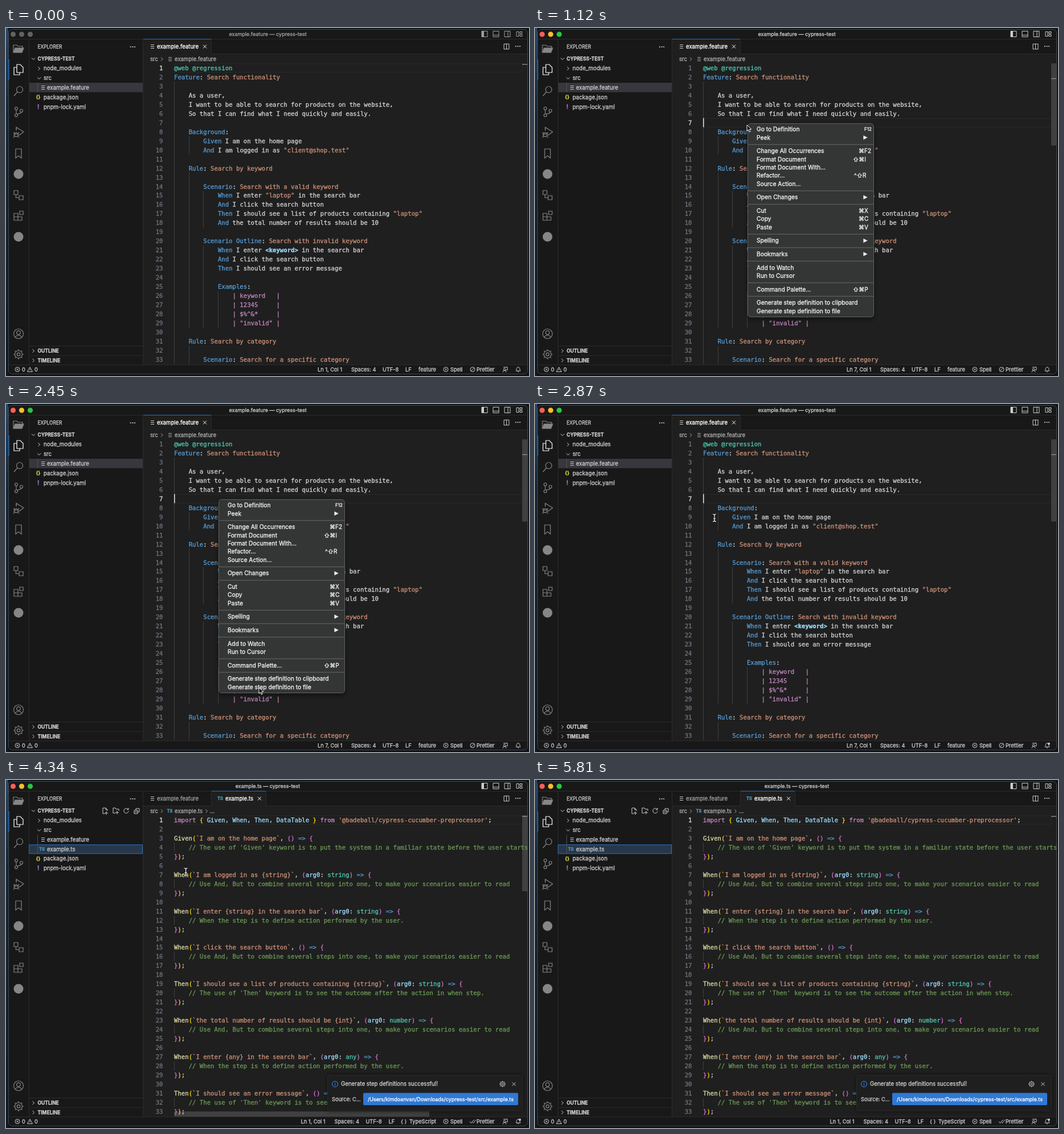
These frames come from a looping animation (918 by 610 pixels, 5.88 s). An HTML page with a canvas:

```html
<!DOCTYPE html>
<html lang="en">
<head>
<meta charset="utf-8">
<title>Editor demo</title>
<style>
html, body { margin: 0; width: 100%; height: 100%; overflow: hidden; background: #0c1620; }
canvas { display: block; }
</style>
</head>
<body>
<canvas id="stage" width="918" height="610"></canvas>
<script>
const c = document.getElementById('stage').getContext('2d');
const LOOP = 5880, STEP = 70;
const T = { enter: 70, focus: 630, menu: 1050, pick: 2590, gone: 2730, bell: 2870, made: 2940, hover: 3290, blur: 3430, open: 3780, leave: 5000 };
const GREY = '#868686', TEXT = '#cccccc', BLUE = '#569cd6', ORANGE = '#ce9178', PURPLE = '#c586c0',
  TEAL = '#4ec9b0', SKY = '#9cdcfe', GOLD = '#ffd700', ORCHID = '#da70d6', CODE = '#d4d4d4', ACCENT = '#2a6fb8';
const CW = 6.41, LH = 15.97, LEFT = 295, TOP = 70, MONO = '10.65px "DejaVu Sans Mono", monospace';

// ---------- documents ----------
const feature = `@web @regression
Feature: Search functionality

    As a user,
    I want to be able to search for products on the website,
    So that I can find what I need quickly and easily.

    Background:
        Given I am on the home page
        And I am logged in as "client@shop.test"

    Rule: Search by keyword

        Scenario: Search with a valid keyword
            When I enter "laptop" in the search bar
            And I click the search button
            Then I should see a list of products containing "laptop"
            And the total number of results should be 10

        Scenario Outline: Search with invalid keyword
            When I enter <keyword> in the search bar
            And I click the search button
            Then I should see an error message

            Examples:
                | keyword   |
                | 12345     |
                | $%^&*     |
                | "invalid" |

    Rule: Search by category

        Scenario: Search for a specific category`.split('\n');

const notes = {
  given: "The use of 'Given' keyword is to put the system in a familiar state before the user starts",
  and: 'Use And, But to combine several steps into one, to make your scenarios easier to read',
  when: 'When the step is to define action performed by the user.',
  then: "The use of 'Then' keyword is to see the outcome after the action in when step."
};
const step = (word, text, type, note) =>
  [`${word}(\`${text}\`, (${type && 'arg0: ' + type}) => {`, '    // ' + notes[note], '});', ''];
const script = [
  "import { Given, When, Then, DataTable } from '@badeball/cypress-cucumber-preprocessor';", '',
  ...step('Given', 'I am on the home page', '', 'given'),
  ...step('When', 'I am logged in as {string}', 'string', 'and'),
  ...step('When', 'I enter {string} in the search bar', 'string', 'when'),
  ...step('When', 'I click the search button', '', 'and'),
  ...step('Then', 'I should see a list of products containing {string}', 'string', 'then'),
  ...step('When', 'the total number of results should be {int}', 'number', 'and'),
  ...step('When', 'I enter {any} in the search bar', 'any', 'when'),
  ...step('Then', 'I should see an error message', '', 'then')
].slice(0, 33);

const featureRules = [
  [/@.*/y, TEAL], [/\|.*/y, PURPLE],
  [/(Feature|Rule|Scenario Outline|Scenario|Background|Examples)(?=:)/y, BLUE],
  [/(?<=^ *(Feature|Rule|Scenario Outline|Scenario):).+/y, ORANGE],
  [/(?<=^ *)(Given|When|Then|And)\b/y, BLUE],
  [/"[^"]*"/y, ORANGE], [/<\w+>/y, SKY, 700], [/\w+|./y, CODE]
];
const scriptRules = [
  [/\/\/.*/y, '#6a9955'], [/`[^`]*`|'[^']*'/y, ORANGE], [/import|from/y, PURPLE],
  [/(Given|When|Then)(?=\()/y, '#dcdcaa'], [/=>/y, BLUE], [/(?<=: )\w+/y, TEAL], [/\w+/y, SKY],
  [/(?<=\w)\(|(?<=\})\)|(?<=import )\{|\}(?= from)/y, GOLD], [/[(){}]/y, ORCHID], [/./y, CODE]
];
// [column, first line, last line]
const featureGuides = [[0, 3, 33], [4, 9, 10], [4, 13, 29], [4, 32, 33], [8, 15, 18], [8, 21, 29], [12, 26, 29]];
const scriptGuides = Array.from({ length: 8 }, (_, i) => [0, 4 + i * 4, 4 + i * 4]);

// ---------- drawing helpers ----------
// A hairline stroke gives the glyphs a slightly heavier look.
function ink(s, x, y, color) {
  c.fillStyle = c.strokeStyle = color;
  c.lineWidth = 0.3;
  c.fillText(s, x, y);
  c.strokeText(s, x, y);
}
function text(s, x, y, color = TEXT, size = 9.7, weight = 400, align = 'left') {
  c.font = `${weight} ${size}px Inter, sans-serif`;
  c.textAlign = align;
  ink(s, x, y + size * 0.36, color);
}
function rect(x, y, w, h, color) {
  c.fillStyle = color;
  c.fillRect(x, y, w, h);
}
function box(x, y, w, h, r, fill, stroke) {
  c.beginPath();
  c.roundRect(x, y, w, h, r);
  c.fillStyle = fill;
  c.fill();
  if (stroke) { c.strokeStyle = stroke; c.lineWidth = 1; c.stroke(); }
}
function dot(x, y, r, color) {
  c.beginPath();
  c.arc(x, y, r, 0, 7);
  c.fillStyle = color;
  c.fill();
}
function icon(d, x, y, color = TEXT, width = 1, fill) {
  const p = new Path2D(d);
  c.save();
  c.translate(x, y);
  if (fill) { c.fillStyle = fill; c.fill(p); }
  c.strokeStyle = color;
  c.lineWidth = width;
  c.stroke(p);
  c.restore();
}
const ring = (x, y, r) => `M${x + r} ${y}a${r} ${r} 0 1 1 ${-2 * r} 0a${r} ${r} 0 1 1 ${2 * r} 0`;
const gear = r => ring(0, 0, r * 0.3) + ring(0, 0, r * 0.72) + Array.from({ length: 8 }, (_, i) => {
  const a = i * Math.PI / 4, u = Math.cos(a) * r, v = Math.sin(a) * r;
  return `M${u * 0.72} ${v * 0.72}L${u} ${v}`;
}).join('');

const RIGHT = 'M-1.5-3l3 3l-3 3', DOWN = 'M-3-1.5l3 3l3-3', CROSS = 'M-3-3l6 6M3-3l-6 6';
const LINES = 'M-3-3h6M-3 0h6M-3 3h6', NO = ring(0, 0, 4) + 'M-1.6-1.6l3.2 3.2M1.6-1.6l-3.2 3.2';
const activity = [
  [73, 'M-3-9h6l5 5v9h-11zM-3-4h-5v13h10v-4', '#ffffff'],
  [110, ring(2, -2, 5.5) + 'M-2 2L-8 9'],
  [147, ring(-4, -6, 2.5) + ring(-4, 6, 2.5) + ring(5, -2, 2.5) + 'M-4-3.5v7M5 .5c0 3-6 2-8 4'],
  [183, 'M-4-3v-6L9-1L1 5' + ring(-4, 4, 3.4) + 'M-9 0l2 2M1 0l-2 2M-9 4.5h2M-1 4.5h2M-9 9l2-2M1 9l-2-2M-7 3h6'],
  [220, 'M-5-8h10v16l-5-4-5 4z'],
  [293, 'M-8-8h7v7h-7zM1 1h7v7h-7zM-4.5-1v5.5h5.5'],
  [329, 'M-8-4h7v6h-7zM-8 2h7v6h-7zM-1 2h7v6h-7zM2-8h6v6h-6z'],
  [536, ring(0, 0, 8.5) + ring(0, -2, 3.4) + 'M-5.5 6.5c1-5 10-5 11 0'],
  [572, gear(9)]
];

// ---------- window parts ----------
function drawFrame(s) {
  rect(0, 0, 918, 610, '#0b131b');
  const g = c.createLinearGradient(0, 0, 0, 610);
  g.addColorStop(0, '#27476a');
  g.addColorStop(0.25, '#10263b');
  g.addColorStop(1, '#0c1a29');
  rect(0, 0, 4, 610, g);
  box(4.5, 2.5, 911, 604, 6, '#181818', '#484848');
  ['#ff5f57', '#febc2e', '#28c840'].forEach((col, i) => dot(12.5 + i * 15, 11, 4.6, s.focused ? col : '#626262'));
  const tone = s.focused ? TEXT : '#a0a0a0';
  text(`${s.ts ? 'example.ts' : 'example.feature'} — cypress-test`, 459.5, 10.5, tone, 9, 400, 'center');
  [840, 860, 880].forEach((x, i) => {
    icon('M-5-5h10v10h-10z', x, 10.5, tone);
    if (i == 0) rect(x - 5, 5.5, 4, 10, tone);
    if (i == 1) icon('M-5 2h10', x, 10.5, tone);
    if (i == 2) icon('M1-5v10', x, 10.5, tone);
  });
  icon('M-5-4h4v8h-4zM1-4h4v3h-4zM1 1h4v3h-4z', 901, 10.5, tone);
  rect(5, 19, 910, 1, '#2b2b2b');
}

function drawSidebar(s) {
  rect(40, 20, 1, 570, '#2b2b2b');
  rect(240, 20, 1, 570, '#2b2b2b');
  rect(4, 55, 1.5, 36, ACCENT);
  icon('M-9 6v-13h6l2 2h8v3', 22, 37, GREY, 1.2);
  icon('M-9 6l3-8h15l-3 8z', 22, 37, GREY, 1.2, GREY);
  activity.forEach(([y, d, col = GREY]) => icon(d, 22, y, col, 1.2));
  [256, 366].forEach(y => dot(22, y, 8.5, GREY));

  text('EXPLORER', 55.5, 33, TEXT, 8.4);
  text('···', 217, 33, TEXT, 11, 700);
  icon(DOWN, 48, 54);
  text('CYPRESS-TEST', 55.5, 54, TEXT, 8.5, 700);
  if (s.tools) {
    icon('M-4-5h5l3 3v2M-4-5v10h3M1-5v3h3M2 1v6M-1 4h6', 174, 54);
    icon('M-5 4v-9h4l1 2h5v3M-5 4h4M2 0v6M-1 3h6', 193, 54);
    icon('M3.5-2.5a4.2 4.2 0 1 0 .7 3M4-5v3h-3', 211, 54);
    icon('M-4-1h6v6h-6zM-1-1v-3h6v6h-3M-3 2h4', 229, 54);
  }
  if (s.ts) box(40.5, 113.5, 199, 15.5, 0, '#28384c', ACCENT);
  else {
    rect(41, 96, 199, 16.5, '#37373d');
    if (s.hover) rect(41, 113, 199, 16.5, '#2a2d2e');
  }
  icon(RIGHT, 58, 71);
  text('node_modules', 66, 71);
  icon(DOWN, 58, 88);
  text('src', 66, 88);
  icon(LINES, 65, 104.5);
  text('example.feature', 72, 104.5);
  if (s.made) {
    text('TS', 58, 121.5, '#519aba', 7.5, 700);
    text('example.ts', 72, 121.3);
  }
  rect(55, 96, 1, s.made ? 33.5 : 16.5, '#505050');
  const y = s.made ? 138 : 121.3;
  text('{}', 52.5, y, '#cbcb41', 8.5, 700);
  text('package.json', 66, y);
  text('!', 55, y + 16.8, '#a074c4', 10, 700);
  text('pnpm-lock.yaml', 66, y + 16.8);
  ['OUTLINE', 'TIMELINE'].forEach((name, i) => {
    const v = 566 + i * 16.7;
    rect(41, v - 9, 199, 1, '#2b2b2b');
    icon(RIGHT, 48, v);
    text(name, 55.5, v, TEXT, 8.5, 700);
  });
}

function drawTabs(s) {
  rect(241, 20, 674, 570, '#1f1f1f');
  rect(241, 20, 674, 26, '#181818');
  rect(241, 45, 674, 1, '#2b2b2b');
  const x = s.ts ? 361 : 241, w = s.ts ? 95 : 119;
  rect(x, 19, w, 27, '#1f1f1f');
  rect(x, 19, w, 1, ACCENT);
  rect(360, 20, 1, 26, '#2b2b2b');
  icon(LINES, 257, 32.5);
  text('example.feature', 265, 32.5, s.ts ? '#9d9d9d' : '#ffffff', 9.6);
  if (s.ts) {
    rect(456, 20, 1, 26, '#2b2b2b');
    text('TS', 371, 32.5, '#519aba', 7.5, 700);
    text('example.ts', 385, 32.5, '#ffffff', 9.6);
  }
  icon(CROSS, s.ts ? 445 : 349, 32.5, '#ffffff');
  icon('M-4.5-4.5h9v9h-9zM0-4.5v9', 878.5, 32.5);
  text('···', 893, 32.5, TEXT, 11, 700);
  const grey = '#a9a9a9';
  text('src', 253, 54.5, grey);
  icon(RIGHT, 273.5, 54.5, grey);
  if (s.ts) {
    text('TS', 282.5, 54.5, '#519aba', 7.5, 700);
    text('example.ts', 296, 54.5, grey, 9.6);
    icon(RIGHT, 352, 54.5, grey);
    text('...', 358, 54.5, grey);
  } else {
    icon(LINES, 288, 54.5, grey);
    text('example.feature', 296, 54.5, grey, 9.6);
  }
}

function drawCode(s) {
  const lines = s.ts ? script : feature, rules = s.ts ? scriptRules : featureRules;
  c.save();
  c.beginPath();
  c.rect(241, 62, 674, 528);
  c.clip();
  const cy = TOP + (s.line - 1) * LH;
  c.strokeStyle = '#292929';
  c.lineWidth = 1;
  c.strokeRect(LEFT + 0.5, Math.round(cy - 8) + 0.5, 611, 15);
  for (const [col, a, b] of s.ts ? scriptGuides : featureGuides)
    rect(Math.round(LEFT + col * CW), TOP + (a - 1.5) * LH, 1, (b - a + 1) * LH, '#404040');

  c.globalAlpha = s.bars;
  rect(906, 62, 9, s.ts ? 133 : 144, '#404040');
  if (s.ts) rect(295, 581, 448, 9, '#404040');
  c.globalAlpha = 1;
  rect(906, s.line == 7 ? 88 : 63, 9, 1.3, '#909090');

  lines.forEach((line, i) => {
    const y = TOP + i * LH + 3.9;
    c.font = MONO;
    c.textAlign = 'right';
    ink(i + 1, 275.5, y, i + 1 == s.line ? '#e0e0e0' : '#6e7681');
    c.textAlign = 'left';
    for (let at = 0; at < line.length;) {
      for (const [re, color, weight = 400] of rules) {
        re.lastIndex = at;
        const m = re.exec(line);
        if (!m) continue;
        c.font = `${weight} ${MONO}`;
        ink(m[0], LEFT + at * CW, y, color);
        at += m[0].length;
        break;
      }
    }
  });
  if (s.caret) rect(LEFT, cy - 8, 1.5, 16, '#e8e8e8');
  c.restore();
}

function drawStatus(s) {
  rect(5, 590, 910, 1, '#2b2b2b');
  const y = 598.5, put = (str, x) => text(str, x, y, TEXT, 9.2);
  icon(NO, 20, y);
  put('0', 28);
  icon('M0-4l4.5 8h-9zM0-1v2.5', 42, y);
  put('0', 50);
  const d = s.ts ? -29.5 : 0;
  put(`Ln ${s.line}, Col 1`, 547 + d);
  put('Spaces: 4', 606 + d);
  put('UTF-8', 661 + d);
  put('LF', 701 + d);
  if (s.ts) {
    put('{ }', 693);
    put('TypeScript', 708);
  } else put('feature', 724);
  icon(NO, 772, y);
  put('Spell', 780);
  icon(s.ts ? 'M-5 0l2.5 3l5-6M0 2l1 1l5-6' : ring(0, 0, 4) + 'M-2.8 2.8l5.6-5.6', 819, y);
  put('Prettier', 826);
  icon(ring(-1, 0, 1.8) + 'M-4 5c0-4 6-4 6 0M-3-4h7v5h-2l-1 1', 876, y);
  icon('M-4 2.5c2-2 0-6 4-6.5c4 .5 2 4.5 4 6.5zM-1 4h2', 899, y);
  if (s.bell) dot(902, 595.5, 2, TEXT);
}

const menu = [
  [['Go to Definition', 'F12', 578], ['Peek', '>']],
  [['Change All Occurrences', '⌘F2', 568], ['Format Document', '⇧⌘I', 558], ['Format Document With...'],
    ['Refactor...', '^⇧R', 560], ['Source Action...']],
  [['Open Changes', '>']],
  [['Cut', '⌘X', 568], ['Copy', '⌘C', 568], ['Paste', '⌘V', 568]],
  [['Spelling', '>']],
  [['Bookmarks', '>']],
  [['Add to Watch'], ['Run to Cursor']],
  [['Command Palette...', '⇧⌘P', 558]],
  [['Generate step definition to clipboard'], ['Generate step definition to file']]
];
function drawMenu(alpha) {
  if (!alpha) return;
  c.save();
  c.globalAlpha = alpha;
  c.shadowColor = 'rgba(0,0,0,.5)';
  c.shadowBlur = 10;
  c.shadowOffsetY = 4;
  box(373.5, 167.5, 221, 339, 5, '#343535');
  c.shadowColor = 'transparent';
  box(373.5, 167.5, 221, 339, 5, '#343535', '#606060');
  let y = 177.5;
  menu.forEach((group, i) => {
    if (i) {
      rect(374, y - 2.6, 220, 1, '#686868');
      y += 9.2;
    }
    for (const [name, key, x] of group) {
      text(name, 389, y, '#f4f4f4', 10.3);
      if (key == '>') icon('M-3-3.5l7 3.5l-7 3.5z', 579.5, y, '#f4f4f4', 0.2, '#f4f4f4');
      else if (key) text(key, x, y, '#f4f4f4', key == 'F12' ? 8 : 10);
      y += 14.4;
    }
  });
  c.restore();
}

function drawToast() {
  c.save();
  c.shadowColor = 'rgba(0,0,0,.6)';
  c.shadowBlur = 7;
  box(564.5, 517.5, 342, 62.5, 3, '#1f1f1f');
  c.restore();
  box(564.5, 517.5, 342, 62.5, 3, '#1f1f1f', '#2b2b2b');
  icon(ring(0, 0, 5) + 'M0-.8v3.3M0-2.8v1.1', 577.5, 533, '#3794ff');
  text('Generate step definitions successful!', 588, 533);
  icon(gear(5.5), 871.5, 533);
  icon(CROSS, 891.5, 533);
  text('Source: C...', 572, 559.5, TEXT, 9.2);
  box(627, 548.5, 272, 21.5, 2, '#2f78d4');
  text('/Users/kimdoanvan/Downloads/cypress-test/src/example.ts', 763, 559.5, '#ffffff', 9, 400, 'center');
}

// ---------- pointer ----------
const path = [[70, 560, 30], [630, 372, 172], [1050, 372, 170], [1470, 372, 170], [2100, 444, 497], [2590, 444, 497],
  [2870, 315, 199], [3010, 315, 199], [3500, 150, 132], [3990, 150, 132], [4620, 434, 181], [4830, 434, 181], [5320, 935, 320]];
function pointerAt(t) {
  const i = path.findIndex(k => k[0] > t);
  if (i < 1) return null;
  const [t0, x0, y0] = path[i - 1], [t1, x1, y1] = path[i];
  const p = (t - t0) / (t1 - t0), e = p * p * (3 - 2 * p);
  return [x0 + (x1 - x0) * e, y0 + (y1 - y0) * e];
}
function drawPointer(t) {
  const at = pointerAt(t);
  if (!at) return;
  const [x, y] = at, open = t >= T.menu && t < T.gone;
  c.lineJoin = 'round';
  if (!open && x > 290 && y > 62) {
    const beam = 'M-3-6q3 0 3 2q0-2 3-2M0-4v9M-3 7q3 0 3-2q0 2 3 2M-2 2h4';
    icon(beam, x, y, '#111111', 2.6);
    icon(beam, x, y, '#ffffff', 1.2);
  } else if (!open && x < 240) {
    icon('M-2.5-5.5q1.5-1 2 .5l.8 3q1-.8 1.8.2q1-.6 1.6.4q1.2-.2 1.3 1v2.6l-1 3.8h-5.5l-3.2-4.5q0-1.6 1.9-.6z', x, y, '#111111', 0.8, '#ffffff');
  } else {
    icon('M0 0v10.5l2.5-2.3l1.7 4l1.9-.8l-1.7-3.9h3.4z', x, y, '#ffffff', 1, '#000000');
  }
  c.lineJoin = 'miter';
}

// ---------- timeline ----------
function draw(t) {
  const ts = t >= T.open, focused = t >= T.focus;
  const s = {
    ts, focused,
    line: focused && !ts ? 7 : 1,
    caret: focused && t < T.blur,
    bars: t < T.enter ? 0 : Math.max(0, Math.min(1, 1 - (t - T.leave) / 700)),
    bell: t >= T.bell,
    made: t >= T.made,
    hover: t >= T.blur,
    tools: t >= T.hover
  };
  c.lineJoin = 'miter';
  drawFrame(s);
  drawSidebar(s);
  drawTabs(s);
  drawCode(s);
  drawStatus(s);
  if (s.made) drawToast();
  if (t >= T.menu) drawMenu(Math.max(0, Math.min(1, 1 - (t - T.pick) / (T.gone - T.pick))));
  drawPointer(t);
}

const start = performance.now();
function tick() {
  const t = (performance.now() - start) % LOOP;
  draw(Math.floor(t / STEP) * STEP);
  requestAnimationFrame(tick);
}
tick();
</script>
</body>
</html>
```
